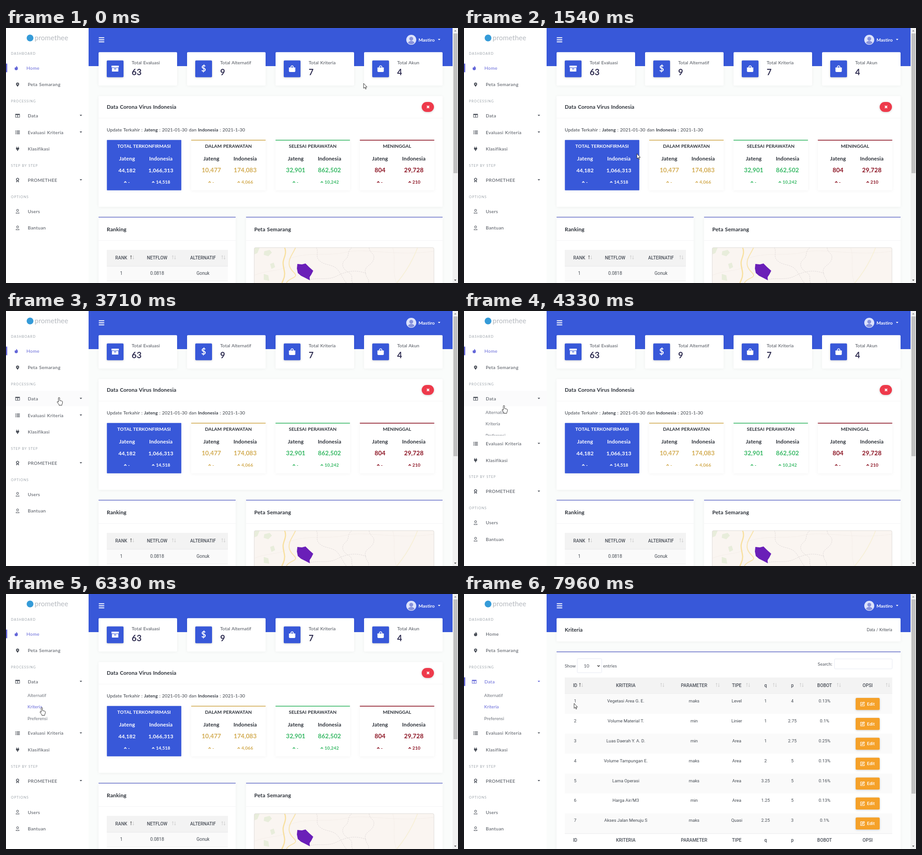
An HTML page for the animation above (8 s loop, 996x562 px).

```html
<!DOCTYPE html>
<html lang="id">
<head>
<meta charset="utf-8">
<title>Dashboard</title>
<style>
html, body { margin: 0; width: 100%; height: 100%; overflow: hidden; background: #fafcfb; }
svg { display: block; width: 100vw; height: 100vh; }
text { font-family: Lato, 'Open Sans', sans-serif; letter-spacing: .01em; word-spacing: .06em; white-space: pre; }
.tb { font-family: Roboto, Inter, sans-serif; letter-spacing: 0; word-spacing: 0; }
.sh { filter: drop-shadow(0 1px 3px #0000000c); }
.bs { filter: drop-shadow(0 1px 2px #00000030); }
</style>
</head>
<body>
<svg viewBox="0 0 996 562">
  <defs>
    <clipPath id="mapClip"><rect x="547" y="484" width="396" height="90" rx="3"/></clipPath>
    <clipPath id="subClip"><rect id="subBox" y="212" width="182" height="0"/></clipPath>
  </defs>
  <g id="frame"></g><g id="home"></g><g id="table"></g><g id="side"></g><g id="cursor"></g>
</svg>
<script>
const BLUE = '#3858d9', PURPLE = '#6366d8', DARK = '#2b3038', GREY = '#4b5059';
const $ = id => document.getElementById(id);

// y is the optical middle of the text
const text = (x, y, s, { z = 10.2, w = 400, c = GREY, a = 'start', k = '', ls } = {}) =>
  `<text x="${x}" y="${y + z * .36}" font-size="${z}" font-weight="${w}" fill="${c}" text-anchor="${a}" class="${k}"` +
  `${ls ? ` style="letter-spacing:${ls}px"` : ''}>${s}</text>`;
const mid = (x, y, s, o) => text(x, y, s, { a: 'middle', ...o });
const rect = (x, y, w, h, fill, more = '') =>
  `<rect x="${x}" y="${y}" width="${w}" height="${h}" fill="${fill}" ${more}/>`;
const fill = (x, y, d, c) => `<path transform="translate(${x} ${y})" d="${d}" fill="${c}" fill-rule="evenodd"/>`;
const line = (x, y, d, c, w = 1, more = '') =>
  `<path transform="translate(${x} ${y})" d="${d}" fill="none" stroke="${c}" stroke-width="${w}" ${more}/>`;
const card = (x, y, w, h) => rect(x, y, w, h, '#fff', 'rx="2" class="sh"');
const caret = (x, y, c) => fill(x, y, 'M-2.7-1.4h5.4L0 1.5z', c);
const sort = (x, y, on) =>
  line(x - 2.5, y, 'M0 4v-8M-1.7-2L0-4 1.7-2', on ? '#555' : '#ccc', .9) +
  line(x + 2.5, y, 'M0-4v8M-1.7 2L0 4 1.7 2', '#ccc', .9);

const ICON = {
  fire: 'M0-5c1 2 4 3 3.5 6.5a3.5 3.5 0 0 1-7 0c0-2 1-2.5 1.3-3.5l1 1.5C-.2-1.5.4-3 0-5z',
  pin: 'M0 5C-1 3-3.5 1-3.5-1a3.5 3.5 0 0 1 7 0C3.5 1 1 3 0 5zM0-2.4a1.2 1.2 0 1 0 .01 0z',
  cols: 'M-5-4H5v8H-5zM-4-1.5V3h3.4v-4.5zM.6-1.5V3H4v-4.5z',
  list: [-3.7, -.7, 2.3].map(y => `M-5 ${y}h2v1.5h-2zM-2 ${y}h7v1.5h-7z`).join(''),
  plug: 'M-2.5-5h1.2v2.5h2.6V-5h1.2v2.5h1V-1c0 2-1.3 3-2.6 3.2v2.3H-.9V2.2C-2.2 2-3.5 1-3.5-1v-1.5h1z',
  award: 'M0-5a3.4 3.4 0 1 0 .01 0zM0-3.4a1.8 1.8 0 1 1-.01 0zM-2.6 1.3L-3 5-1 4l.6-2zM2.6 1.3L3 5 1 4 .4 2z',
  user: 'M0-5a2.7 2.7 0 1 0 .01 0zM0-4a1.7 1.7 0 1 1-.01 0zM-4 4.5C-4-.2 4-.2 4 4.5zM-2.9 3.5H2.9C2.4.6-2.4.6-2.9 3.5z',
  box: 'M-8-7H8v4H-8zM-7-2H7v8H-7zM-2.5-.5v1.5h5V-.5z',
  bag: 'M-7-3h3.2c0-6 7.6-6 7.6 0H7v8q0 2-2 2H-5q-2 0-2-2zM-2.3-3h4.6c0-3.6-4.6-3.6-4.6 0z',
};

function drawFrame() {
  return rect(182, 0, 802, 84, BLUE) +
    [21.5, 26, 30.5].map(y => rect(204.5, y - 1, 12, 2, '#fff')).join('') +
    '<circle cx="893" cy="26" r="11" fill="#dde3fb"/>' +
    fill(893, 26, 'M0-6.5a4.2 4.2 0 1 0 .01 0zM-7 7C-6 1 6 1 7 7Q0 13-7 7z', '#8792dc') +
    text(909, 26, 'Mastiro', { w: 700, c: '#fff' }) + caret(954.5, 25.5, '#fff') +
    rect(984, 0, 12, 562, '#f1f1f1') +
    fill(990, 6, 'M-2.5 1.5h5L0-1.5z', '#8a8a8a') + fill(990, 556, 'M-2.5-1.5h5L0 1.5z', '#505050');
}

function drawMap() {
  const bounds = ['M684 484c6 12-4 20 8 30s30 6 40 20 10 18 18 28', 'M762 484c-12 10-4 18-14 26s-8 20 6 28 4 16 10 24',
    'M800 484c2 14 14 12 10 26s-22 14-18 30 10 14 6 22', 'M668 555c20-6 40 2 60-8s40-16 66-6'];
  const roads = ['M547 545c30-12 50-8 70-18', 'M620 510c40-18 90-6 130-16s110 10 193-2', 'M852 484c8 20-2 50 8 78'];
  return '<g clip-path="url(#mapClip)">' + rect(547, 484, 396, 78, '#faf5f1') +
    fill(0, 0, 'M547 484h12l-5 12-7 3zM569 492l12-3 5 6-8 8-10-3zM582 520l8-3 3 10-8 4zM568 542l10 3 2 12-12-2z', '#e8eddb') +
    roads.map(d => line(0, 0, d, '#f3ece7', .8)).join('') +
    bounds.map(d => line(0, 0, d, '#dad4d3', .8, 'stroke-dasharray="3 1.5"')).join('') +
    line(0, 0, 'M907 484c-10 26-24 52-46 78', '#f7f0d8', 1.8) +
    line(0, 0, 'M614 484c5 12-1 20-3 30s3 18 3 28-3 12-6 20', '#f8e0a0', 2.6) +
    line(0, 0, 'M638 484c-6 14-16 24-14 38s16 18 14 24-16 6-20 16', '#f8e4ae', 2) +
    fill(0, 0, 'M642 520l10 1 8-2 8 8 9 8-4 8-4 6 .5 7-9.5-5-10-5-7-6-2-10z', '#6a1fb8') + '</g>' +
    rect(547, 484, 396, 90, 'none', 'rx="3" stroke="#dedbd8"');
}

function drawHome() {
  let s = rect(986, 12, 9, 308, '#c1c1c1');
  [['Evaluasi', 63, 'box'], ['Alternatif', 9], ['Kriteria', 7, 'bag'], ['Akun', 4, 'bag']].forEach(([name, n, icon], i) => {
    const x = 204 + 195 * i;
    s += card(x, 53.3, 173, 73.4) + rect(x + 18, 71.5, 37, 37, BLUE, 'rx="2" class="bs"') +
      (icon ? fill(x + 36.5, 90, ICON[icon], '#fff') : mid(x + 36.5, 90, '$', { z: 18, w: 700, c: '#fff' })) +
      text(x + 73, 76.5, 'Total ' + name) + text(x + 73, 97.5, n, { z: 18.5, w: 700, c: '#302e52' });
  });

  s += card(204, 150, 758, 244) + rect(204, 198, 758, 1, '#f5f5f6') +
    text(222, 174, 'Data Corona Virus Indonesia', { z: 11.7, w: 700, c: DARK }) +
    rect(916, 163, 27, 22, '#ee3a4b', 'rx="11" class="bs"') + line(930, 174, 'M-2.5-2.5l5 5M2.5-2.5l-5 5', '#fff', 2) +
    text(222, 224, 'Update Terkahir : <tspan font-weight="700">Jateng</tspan> : 2021-01-30 dan <tspan font-weight="700">Indonesia</tspan> : 2021-1-30', { c: '#3a3f47' });

  [['TOTAL TERKONFIRMASI', '#fff', '44,182', '1,066,313', '14,518'],
   ['DALAM PERAWATAN', '#d2ab51', '10,477', '174,083', '4,066'],
   ['SELESAI PERAWATAN', '#36b864', '32,901', '862,502', '10,242'],
   ['MENINGGAL', '#8a1020', '804', '29,728', '210']].forEach(([title, c, local, all, up], i) => {
    const x = 222.3 + 185.8 * i, cx = x + 82, ink = i ? DARK : '#fff';
    s += rect(x, 246.7, 164, 111, i ? '#fff' : BLUE, 'rx="1" class="sh"') +
      (i ? rect(x, 246.5, 164, 1.6, c) : '') + mid(cx, 260.5, title, { w: 700, c: ink });
    [['Jateng', local, '-', -37.5], ['Indonesia', all, up, 37]].forEach(([name, n, d, dx]) => {
      const m = cx + dx, left = m - 2.6 * d.length - 1.3;
      s += mid(m, 287.5, name, { z: 11.8, w: 700, c: ink }) + mid(m, 313.5, n, { z: i ? 13.4 : 11.9, w: 700, c }) +
        line(left, 339.5, 'M-2.5 1.5L0-1l2.5 2.5', c, 1.7) + text(left + 6, 339.5, d, { z: 9.9, w: 700, c });
    });
  });

  s += card(204, 416, 302, 160) + card(529, 416, 433, 160) +
    [[204, 302, 'Ranking'], [529, 433, 'Peta Semarang']].map(([x, w, name]) =>
      rect(x, 416.2, w, 1.5, '#6670c8') + rect(x, 468, w, 1, '#f5f5f6') +
      text(x + 18, 443.5, name, { z: 11.9, w: 700, c: DARK })).join('') +
    rect(222, 489, 267, 36, '#f3f3f3') + rect(222, 525, 267, 32, '#fafafa') +
    rect(222, 524.5, 267, 1, '#e8e8ea') + rect(222, 557, 267, 1, '#eee');
  [[254, 278, 'RANK', 1], [333, 370, 'NETFLOW', '0.0818'], [434, 479, 'ALTERNATIF', 'Gonuk']].forEach(([x, sx, head, v], i) =>
    s += mid(x, 506, head, { z: 10, w: 500, k: 'tb' }) + sort(sx, 505.5, !i) +
      mid(x, 540.5, v, { z: 10, c: '#444a52', k: 'tb' }));
  return s + drawMap();
}

function drawTable() {
  const cols = [['ID', 245, 258], ['KRITERIA', 356.5, 437], ['PARAMETER', 507, 559], ['TIPE', 601, 626],
    ['q', 664.5, 685], ['p', 723.5, 744], ['BOBOT', 794.5, 826], ['OPSI', 889.5, 934]];
  const rows = ['Vegetasi Area G. E.|maks|Level|1|4|0.13%', 'Volume Material T.|min|Linier|1|2.75|0.1%',
    'Luas Daerah Y. A. D.|min|Area|1|2.75|0.25%', 'Volume Tampungan E.|maks|Area|2|5|0.13%',
    'Lama Operasi|maks|Area|3.25|5|0.16%', 'Harga Air/M3|min|Area|1.25|5|0.13%', 'Akses Jalan Menuju S|maks|Quasi|2.25|3|0.1%'];
  const head = { z: 10.1, w: 500, k: 'tb' };
  let s = rect(986, 12, 9, 428, '#c1c1c1') + card(204, 53.3, 758, 51.2) +
    text(222, 79, 'Kriteria', { z: 11.5, w: 700, c: DARK }) + text(943.5, 79, 'Data / Kriteria', { z: 8.5, c: '#40454d', a: 'end' }) +
    card(204, 126.5, 758, 460) + rect(204, 126.7, 758, 1.6, '#6670c8') +
    text(222, 158.5, 'Show', { z: 9.9 }) + rect(249.5, 142.5, 54, 31, '#fff', 'rx="2" stroke="#e6e9f2"') +
    mid(270, 158.5, '10') + line(296.5, 158.5, 'M-2.5-1.3L0 1.3l2.5-2.6', '#333', 1.4) + text(306.5, 158.5, 'entries', { z: 9.9 }) +
    text(811.5, 154, 'Search:', { z: 9.8, a: 'end' }) + rect(816.5, 143, 127, 22, '#fff', 'rx="2" stroke="#e6e9f2"') +
    rect(222, 184, 721.5, 36, '#f3f3f3') + rect(222, 219.5, 721.5, 1, '#e8e8ea');
  cols.forEach(([name, x, sx], i) => s += mid(x, 201, name, head) + sort(sx, 200.5, !i) + mid(x, 542.5, name, head));
  rows.forEach((row, i) => {
    const y = 220 + 43.9 * i;
    if (i % 2 == 0) s += rect(222, y, 721.5, 44, '#fafafa');
    [i + 1, ...row.split('|')].forEach((v, j) => s += mid(cols[j][1], y + 15.5, v, { z: 9.7, c: '#444a52', k: 'tb' }));
    s += rect(863, y + 9, 53, 26.5, '#f5a129', 'rx="2.5" class="bs"') +
      line(878, y + 22.2, 'M1-3.5h-5v8h8v-4M-1.5 2l.4-2 4.2-4.2 1.6 1.6L.5 1.6z', '#fff', 1.1) +
      text(888, y + 22.2, 'Edit', { z: 9.5, w: 700, c: '#fff' });
  });
  return s + rect(222, 527.5, 721.5, 1, '#e8e8ea');
}

function drawSide(active, open, hover) {
  const item = (y, name, icon, more) => {
    const on = name == active, c = on ? PURPLE : GREY, dx = on ? -3 : 0;
    return (on ? rect(0, y - 9.5, 2.7, 19, PURPLE) : '') + fill(25.5 + dx, y, ICON[icon], c) +
      text(48 + dx, y, name, { c, ls: .38 }) + (more ? caret(165, y - .5, c) : '');
  };
  const head = (y, s) => text(11, y, s, { z: 7.3, c: '#9ca3aa', ls: 1.05 });
  const onData = active == 'Data';
  const sub = ['Alternatif', 'Kriteria', 'Preferensi'].map((name, i) => {
    const on = name == hover || (onData && name == 'Kriteria');
    return text(onData ? 44.5 : 47.5, 223.5 + 25.5 * i, name, { z: 9.7, c: on ? PURPLE : '#6b7079' });
  }).join('');
  $('subBox').setAttribute('height', open);
  return rect(0, 0, 182, 562, '#fff') +
    '<circle cx="53" cy="22" r="7.5" fill="#359bd8"/>' + text(63, 22, 'promethee', { z: 15.2, c: '#b4b8be' }) +
    (hover == 'Data' ? rect(0, 176, 182, 34, '#fbfbfc') : '') +
    head(56, 'DASHBOARD') + item(88, 'Home', 'fire') + item(124.8, 'Peta Semarang', 'pin') +
    // "Data" is set 11px further right than its neighbours' icons suggest only while inactive
    head(161.5, 'PROCESSING') + item(193.2, 'Data', 'cols', 1) +
    `<g clip-path="url(#subClip)">${sub}</g><g transform="translate(0 ${open})">` +
    item(230, 'Evaluasi Kriteria', 'list', 1) + item(266.5, 'Klasifikasi', 'plug') +
    head(303.3, 'STEP BY STEP') + item(335.2, 'PROMETHEE', 'award', 1) +
    head(372, 'OPTIONS') + item(404.2, 'Users', 'user') + item(440.7, 'Bantuan', 'user') + '</g>';
}

// CSS "ease" curve, solved by bisection
function ease(x) {
  if (x <= 0 || x >= 1) return x <= 0 ? 0 : 1;
  const bez = (u, a, b) => 3 * (1 - u) * u * ((1 - u) * a + u * b) + u ** 3;
  let lo = 0, hi = 1;
  for (let i = 0; i < 20; i++) {
    const m = (lo + hi) / 2;
    if (bez(m, .25, .25) < x) lo = m; else hi = m;
  }
  return bez(lo, .1, 1);
}

const LOOP = 8000, OPEN_AT = 4152, PAGE_AT = 6460;
const PATH = [[0, 788, 122], [1540, 381, 277], [2710, 304, 116], [3600, 120, 190], [4155, 90, 198],
  [4330, 88, 208.5], [5380, 79, 250.5], [6460, 79, 250.5], [6880, 411, 246], [8000, 242, 241]];

function pointer(t) {
  const i = PATH.findIndex(k => k[0] > t), [t0, x0, y0] = PATH[i - 1], [t1, x1, y1] = PATH[i];
  let u = (t - t0) / (t1 - t0);
  u = u * u * (3 - 2 * u);
  return [x0 + (x1 - x0) * u, y0 + (y1 - y0) * u];
}

const HAND = 'M-1.4 1.2a1.4 1.4 0 0 1 2.8 0v5.3l4.6 1q2 .6 1.8 2.5l-.8 4-.8 1.5V17H0v-1.5l-3.6-4.6q-1.4-2 .4-2.3l1.8 1.4z';
const ARROW = 'M0 0v11l2.5-2.3 1.8 4 1.6-.7-1.8-3.8h3.4z';

function draw() {
  const t = performance.now() % LOOP, second = t >= PAGE_AT, [x, y] = pointer(t);
  const open = 76.8 * ease((t - OPEN_AT) / 350), over = x < 182;
  const hover = !over ? '' : y > 176 && y < 211 ? 'Data' : open && y >= 212 && y < 236 ? 'Alternatif' : open && y >= 238 && y < 262 ? 'Kriteria' : '';
  $('home').style.display = second ? 'none' : '';
  $('table').style.display = second ? '' : 'none';
  $('side').innerHTML = drawSide(second ? 'Data' : 'Home', open, hover);
  $('cursor').innerHTML = `<path transform="translate(${x} ${y})" d="${over ? HAND : ARROW}" fill="#fff" stroke="#222" stroke-width=".9" stroke-linejoin="round"/>`;
  requestAnimationFrame(draw);
}

$('frame').innerHTML = drawFrame();
$('home').innerHTML = drawHome();
$('table').innerHTML = drawTable();
draw();
</script>
</body>
</html>
```
